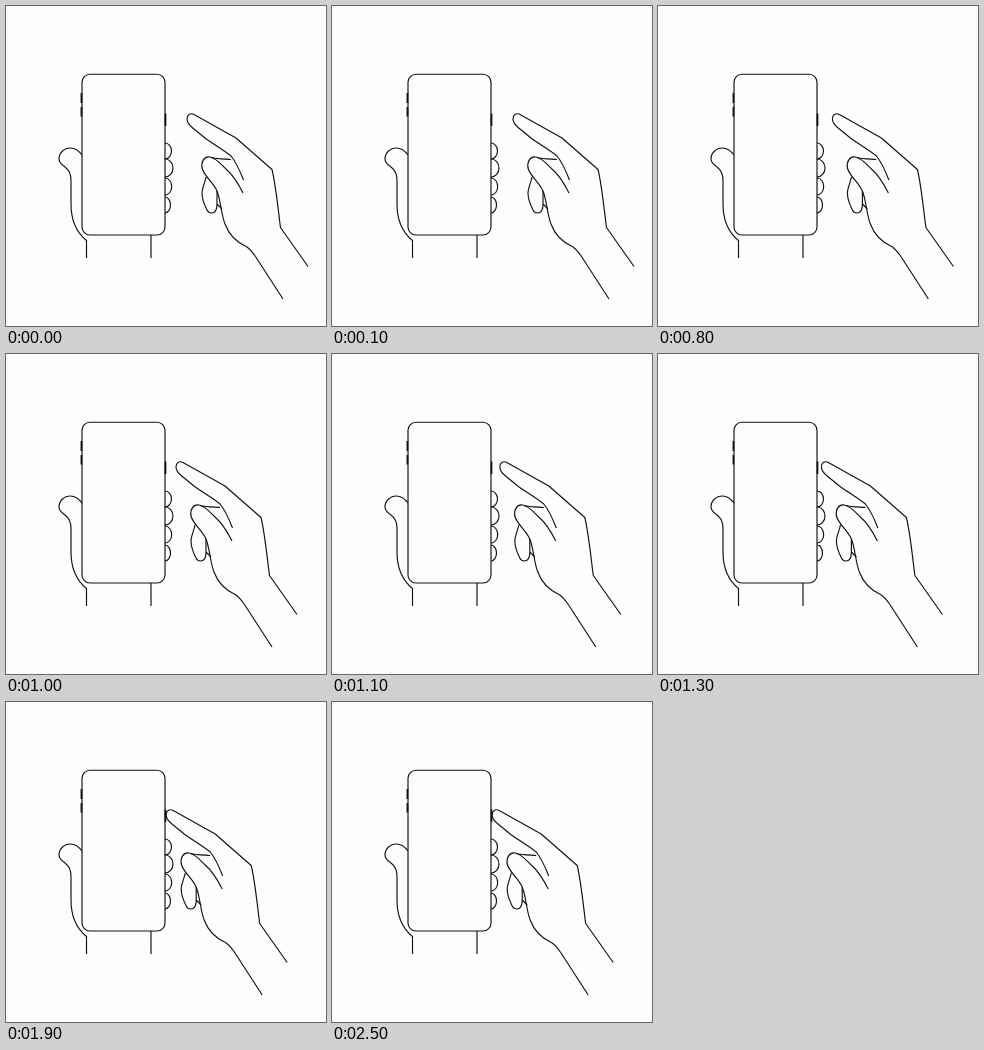
Write an HTML page that moves like this. It is 320 px wide and 320 px high and loops after 2.7 s.

```html
<!DOCTYPE html>
<html lang="en">
<head>
<meta charset="utf-8">
<title>Pressing the side button</title>
<style>
  html, body { margin: 0; width: 100%; height: 100%; overflow: hidden; background: #fefdfe; }
  svg { display: block; width: 100%; height: 100%; }
  path, rect { fill: none; stroke: #111; stroke-width: 1.15; stroke-linejoin: round; }
  .button { stroke-width: 1.7; }
</style>
</head>
<body>
<svg viewBox="0 0 320 320">
  <g id="holding-hand">
    <path d="M76 149C73 145 69 142 64.500 142C58 142 53 147 53 153C53 157 56 159 59 161
             C63 164 65 168 65 174V198C65 214 70 226 80.500 234.500V252M145 229V252"/>
    <path d="M159 137a6.500 8 0 0 1 0 16a8 9 0 0 1 0 18
             M159 172a6.700 8.500 0 0 1 0 17M159 191a5.500 8 0 0 1 0 16"/>
  </g>
  <g id="phone">
    <rect x="76" y="68.200" width="83" height="160.800" rx="8"/>
    <path class="button" d="M75.400 87V97M75.400 101V110.500M159.500 107.500V120"/>
  </g>
  <g id="pressing-hand">
    <path d="M302 260.500L274.500 221.500C272 203 270 180 266 163.500L230 132L188 108.500
             C184 106.500 181 109 181 113C181 118 184.500 120 188 123L199 132
             C207 138 218 144 225 150C230 156 234 165 237.500 174"/>
    <path d="M237 187C232 177 227 169 220 163C215 158 210 152 204 151
             C198 150 195 156 196 162C198 170 207 176 211 185
             C215 195 215 208 219 218C223 229 232 237 241 241
             C244 243 247 247 249.500 250.500L277 293"/>
    <path d="M205 151.500C211 153 218 153 225 153.500
             M200 171C199 177 196 182 196 187C196 193 199 200 201 204
             C203 208 208 208 210 204C211 202 211 200 211 198V185M211 198L216 203"/>
  </g>
</svg>
<script>
  const LOOP = 2700, STEP = 100;
  const START = 500, SPEED = 2.2, REACH = 20.8;
  const hand = document.getElementById("pressing-hand");

  // The hand glides left in 100 ms steps, then rests against the button.
  function offsetAt(time) {
    const steps = Math.floor((time - START) / STEP);
    return -Math.min(REACH, Math.max(0, steps * SPEED));
  }

  function draw() {
    const time = performance.now() % LOOP;
    hand.setAttribute("transform", `translate(${offsetAt(time)} 0)`);
    requestAnimationFrame(draw);
  }
  draw();
</script>
</body>
</html>
```
